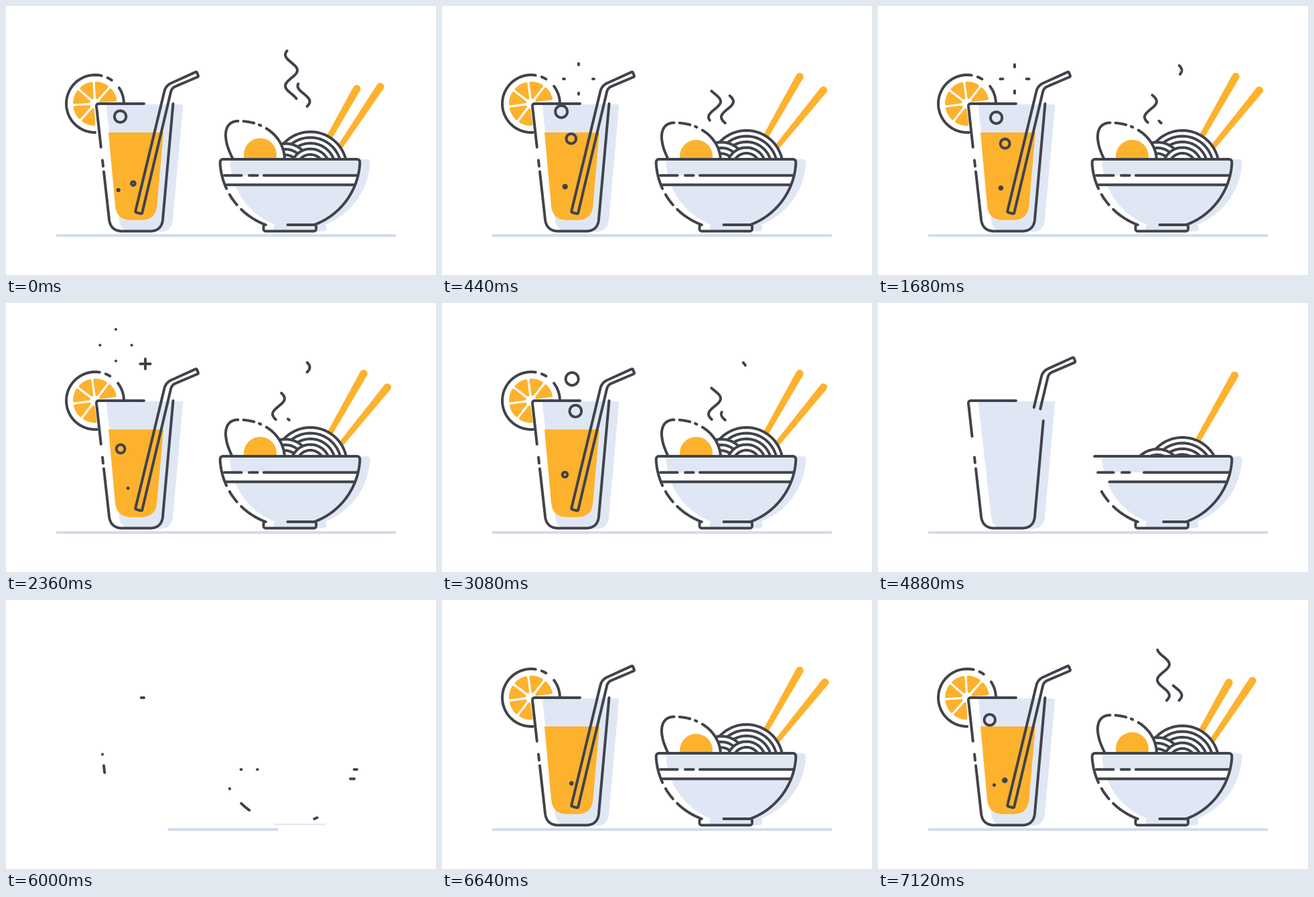
Animation, 642 px wide and 402 px high, one loop 7160 ms. Source, as an HTML page with a canvas:

```html
<!DOCTYPE html>
<html lang="en">
<head>
<meta charset="utf-8">
<title>Lunch</title>
<style>
html, body { margin: 0; width: 100%; height: 100%; overflow: hidden; background: #fff; }
canvas { display: block; }
</style>
</head>
<body>
<canvas id="stage" width="642" height="402"></canvas>
<script>
const ctx = document.getElementById('stage').getContext('2d');
const LOOP = 7.16, EMPTY = 5.5, PI = Math.PI;
const INK = '#40434b', BLUE = '#e0e7f4', ORANGE = '#fdb22e', GROUND = '#d3dcec';

const clamp = x => Math.max(0, Math.min(1, x));
const lerp = (a, b, k) => a + (b - a) * k;
const smooth = x => x * x * (3 - 2 * x);
const easeOut = x => x * (2 - x);
const back = x => x * x * (2.7 * x - 1.7);

// How far something is present: 1 on stage, falling from `leave`, rising from `enter`.
const presence = (t, leave, enter, duration) =>
  t < EMPTY ? 1 - clamp((t - leave) / duration) : clamp((t - enter) / duration);
// The opposite, with a swing past the resting place.
const away = (t, leave, enter) => back(1 - presence(t, leave, enter, t < EMPTY ? 0.28 : 0.36));
// One soft nod of everything after the entrance.
const nod = t => Math.sin(clamp((t - 6.85) / 0.6) * PI) ** 2;

const sample = (n, f) => Array.from({ length: n + 1 }, (_, i) => f(i / n));
const arc = (x, y, r, from, to) => sample(32, k => {
  const a = lerp(from, to, k);
  return [x + r * Math.cos(a), y + r * Math.sin(a)];
});
const bezier = (a, b, c, d) => sample(30, k => [0, 1].map(j => {
  const ab = lerp(a[j], b[j], k), bc = lerp(b[j], c[j], k), cd = lerp(c[j], d[j], k);
  return lerp(lerp(ab, bc, k), lerp(bc, cd, k), k);
}));

// Points [x, y, radius]; a radius rounds that corner.
function rounded(points, closed) {
  const n = points.length, out = [];
  points.forEach(([x, y, r], i) => {
    if (!r) return out.push([x, y]);
    const [a, b] = [points[(i + n - 1) % n], points[(i + 1) % n]].map(([px, py]) => {
      const k = r / Math.hypot(px - x, py - y);
      return [lerp(x, px, k), lerp(y, py, k)];
    });
    out.push(...bezier(a, [lerp(a[0], x, 2 / 3), lerp(a[1], y, 2 / 3)],
      [lerp(b[0], x, 2 / 3), lerp(b[1], y, 2 / 3)], b));
  });
  if (closed) out.push(out[0]);
  return out;
}

function trace(points) {
  ctx.beginPath();
  points.forEach(p => ctx.lineTo(p[0], p[1]));
}

function fill(points, color) {
  trace(points);
  ctx.fillStyle = color;
  ctx.fill();
}

function stroke(points, from = 0, to = 1) {
  if (to - from < 0.002) return;
  trace(points);
  if (from > 0 || to < 1) {
    const length = points.reduce((sum, p, i) =>
      i ? sum + Math.hypot(p[0] - points[i - 1][0], p[1] - points[i - 1][1]) : 0, 0);
    ctx.setLineDash([length * (to - from), 9999]);
    ctx.lineDashOffset = -length * from;
  }
  ctx.stroke();
  ctx.setLineDash([]);
}

function layer(draw, x = 0, y = 0) {
  ctx.save();
  ctx.translate(x, y);
  draw();
  ctx.restore();
}

function clipRect(x, y, w, h) {
  ctx.beginPath();
  ctx.rect(x, y, w, h);
  ctx.clip();
}

function reveal(bottom, height, amount, draw) {
  if (amount <= 0) return;
  layer(() => {
    clipRect(0, bottom - height * amount, 642, height * amount);
    draw();
  });
}

// Glass
const glassLeft = [134.6, 146, 4.5], glassFoot = [[156, 336.5, 18], [232.5, 336.5, 18]], glassRight = [249.5, 146];
const glassBody = rounded([glassLeft, ...glassFoot, [...glassRight, 4]], true);
const glassLines = [
  rounded([[206, 146], glassLeft, [141.8, 211]]),
  [[144, 230.5], [145, 239.5]],
  rounded([[146, 247.5], ...glassFoot, glassRight])
];
const juice = rounded([[153, 189], [235, 189], [223.5, 320, 22], [165, 320, 22]], true);
const straw = rounded([[198, 309.5], [193, 308, 1.5], [238.5, 119, 9], [284.5, 98, 2],
  [287.5, 105.5, 2], [247.5, 122.5, 6], [203, 310.5, 1.5], [198, 309.5]]);

// Bowl
const RIM = 229;
const bowlArc = (from, to) => arc(424, RIM, 104.5, from, to);
const across = (y, from, to) => [[from, y], [to, y]];
const bowlSide = rounded([...bowlArc(1.217, 0.06), [528.3, RIM, 5], [319.7, RIM, 5],
  ...bowlArc(PI - 0.06, PI - 0.434)]);
const bowlBody = rounded([...bowlArc(1.217, 0.06), [528.3, RIM, 5], [319.7, RIM, 5],
  ...bowlArc(PI - 0.06, PI - 1.217)]);
const base = [[384.5, 327, 3], [384.5, 336.5, 4], [463, 336.5, 4], [463, 327, 3]];
const bowlFoot = rounded([...bowlArc(PI - 0.8, PI - 1.217), ...base, [420.5, 327]]);
const bowlLines = [
  bowlArc(PI - 0.53, PI - 0.71),
  across(253.2, 351.5, 326), across(253.2, 375.5, 363), across(253.2, 524, 385),
  across(267.2, 520, 329)
];

const eggLeft = bezier([341, 235], [321, 200], [325, 174.5], [346.5, 174.5]);
const eggRight = bezier([346.5, 174.5], [387, 174], [416, 200], [416, 232]);

const BUBBLE_EVERY = 1.265;
const bubbles = [
  { start: -0.62, popX: 204, popY: 109, sway: 18 },
  { start: -0.2, popX: 226, popY: 65, sway: 10 },
  { start: -0.08, popX: 164, popY: 63, sway: -22 },
  { start: 0.285, popX: 208, popY: 91, sway: 4 }
];

const STEAM_EVERY = 0.685;
const steams = [
  { start: 0.17, x: 407, bottom: 174, top: 127 },
  { start: 0.3, x: 426, bottom: 175, top: 67 },
  { start: 0.57, x: 444.5, bottom: 150, top: 89 }
];

function drawLemon(t) {
  const gone = away(t, 4.6, 6.15), size = 1 - gone;
  if (size < 0.01) return;
  layer(() => {
    ctx.scale(size, size);
    ctx.rotate(4 * nod(t) * PI / 180 - gone);
    stroke(arc(0, 0, 43, 1.5, 4.87));
    stroke(arc(0, 0, 43, 5.09, 5.26));
    stroke(arc(0, 0, 43, 5.63, 6.6));
    ctx.fillStyle = ctx.strokeStyle = ORANGE;
    for (let i = 0; i < 8; i++) {
      const a = PI * (i / 4 - 1 / 6);
      trace([[9.5 * Math.cos(a), 9.5 * Math.sin(a)], ...arc(0, 0, 31, a - 0.28, a + 0.28)]);
      ctx.closePath();
      ctx.fill();
      ctx.stroke();
    }
  }, 133, 146);
}

function drawBurst(q) {
  const inner = 24 * q * q, outer = 7 + 17 * q;
  for (let i = 0; i < 4; i++) {
    ctx.rotate(PI / 2);
    stroke(across(0, inner, outer));
  }
}

// Bubbles speed up on the way, sway, and drift to where they pop.
function drawBubbles(s) {
  const bottom = 277, pull = 290;
  for (const { start, popX, popY, sway } of bubbles) {
    const life = Math.sqrt((bottom - popY) / pull);
    for (let from = start; from < 3; from += BUBBLE_EVERY) {
      const age = s - from, q = clamp(age / life);
      if (age <= 0 || age > life + 0.32) continue;
      layer(() => {
        if (q < 1) stroke(arc(0, 0, Math.min(9.5, 14 * age), 0, 2 * PI));
        else drawBurst((age - life) / 0.32);
      }, lerp(180, popX, q ** 6) + sway * Math.sin(2 * PI * q), bottom - pull * (q * life) ** 2);
    }
  }
}

function drawSteam(s) {
  for (const { start, x, bottom, top } of steams) {
    for (let from = start - STEAM_EVERY; from < 3.6; from += STEAM_EVERY) {
      const height = age => Math.max(top, bottom - 290 * Math.max(0, age));
      const head = height(s - from), tail = height(s - from - 0.26);
      if (tail - head < 0.5) continue;
      stroke(sample(40, k => {
        const y = lerp(tail, head, k);
        return [x - 9 * Math.cos((166 - y) / 23.3 * PI), y];
      }));
    }
  }
}

function drawStraw(t) {
  const gone = away(t, 4.63, 6.15), cut = Math.max(0, gone / 2);
  if (cut > 0.499) return;
  const shift = gone * Math.abs(gone);
  layer(() => stroke(straw, cut, 1 - cut), 22 * shift, -51 * shift);
}

function drawStick(x, y, tipX, tipY, slide, turn) {
  const length = Math.hypot(tipX - x, tipY - y);
  layer(() => {
    ctx.rotate(Math.atan2(tipY - y, tipX - x) + turn);
    ctx.translate(-slide, 0);
    fill([[0, -3.6], ...arc(length, 0, 5.7, -PI / 2, PI / 2), [0, 3.6]], ORANGE);
  }, x, y);
}

function drawRings(x, y, radius, count) {
  fill(arc(x, y, radius, -PI, 0), '#fff');
  for (let i = 0; i < count; i++) stroke(arc(x, y, radius - 8.5 * i, -PI, 0));
}

function drawEgg() {
  fill([...eggLeft, ...eggRight], '#fff');
  fill(arc(379.5, 224.5, 24.5, 0, 2 * PI), ORANGE);
  stroke(eggLeft);
  stroke(eggRight, 0.08, 0.24);
  stroke(eggRight, 0.32, 0.345);
  stroke(eggRight, 0.44, 1);
}

function drawFood(t) {
  clipRect(0, 0, 642, RIM);
  drawStick(468, 222, 534, 105.5, 160 * away(t, 4.7, 6.28) + 21 * nod(t), 0);
  drawStick(491, 222, 569.3, 126, 160 * away(t, 4.6, 6.33) + 2 * nod(t), -0.095 * nod(t));
  layer(() => {
    drawRings(454.5, 240.5, 54.5, 3);
    drawRings(417, 241, 37.5, 3);
    drawRings(454.5, 240.5, 29, 2);
  }, 0, 70 * away(t, 4.667, 6.2) + 2 * nod(t));
  layer(drawEgg, 0, 72 * away(t, 4.6, 6.2) - 2.5 * nod(t));
}

function draw(now) {
  const time = now / 1000 % LOOP;
  // Leaving and entering share one axis; bubbles and steam count from the loop point.
  const t = time < 4 ? time + LOOP : time;
  const s = time > EMPTY ? time - LOOP : time;
  const drawn = (lead = 0) => smooth(presence(t, 4.81 + lead, 5.96 - lead, 0.39));
  const ground = easeOut(presence(t, 4.98, 5.96, 0.23));
  const shade = delay => smooth(presence(t, 4.88, 5.975 + delay, 0.28));

  ctx.fillStyle = '#fff';
  ctx.fillRect(0, 0, 642, 402);
  ctx.strokeStyle = INK;
  ctx.lineWidth = 4;
  ctx.lineCap = ctx.lineJoin = 'round';

  ctx.fillStyle = GROUND;
  ctx.fillRect(lerp(322, 75, ground), 341, 507 * ground, 4);

  drawLemon(t);
  fill(glassBody, '#fff');
  reveal(338, 192, shade(0.03), () => layer(() => fill(glassBody, BLUE), 15, 1));
  reveal(320, 131, smooth(presence(t, 4.6, 6.15, 0.28)), () => fill(juice, ORANGE));
  drawStraw(t);
  glassLines.forEach(line => stroke(line, 0, drawn()));
  drawBubbles(s);

  layer(() => drawFood(t));
  reveal(337, 109, shade(0), () => layer(() => {
    fill(bowlBody, BLUE);
    fill(rounded(base, true), BLUE);
  }, 15, 0));
  layer(() => {
    trace(bowlArc(0, 2 * PI));
    ctx.clip();
    ctx.fillStyle = '#fff';
    ctx.fillRect(319, 253, 210, 14);
  });
  bowlLines.forEach(line => stroke(line, 0, drawn()));
  stroke(bowlSide, 0, drawn(-0.015));
  stroke(bowlFoot, 0, drawn(0.03));
  drawSteam(s);
}

const begin = performance.now();
function tick() {
  draw(performance.now() - begin);
  requestAnimationFrame(tick);
}
tick();
</script>
</body>
</html>
```
